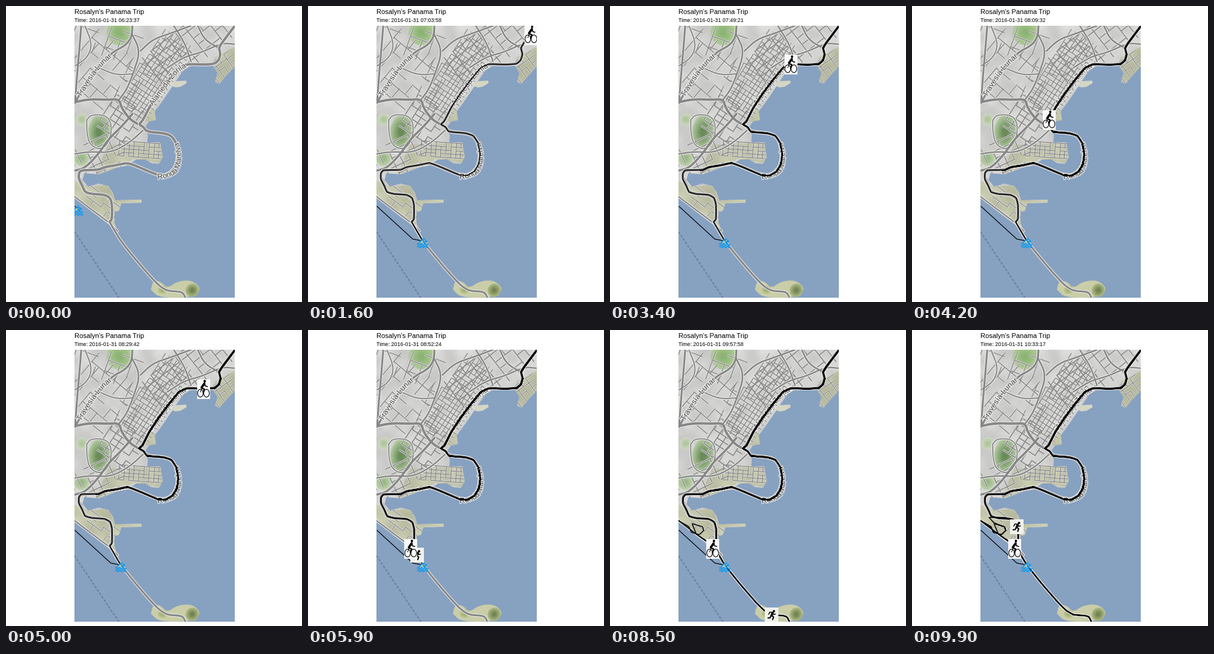
Recreate the animation shown at these times as a matplotlib script. Size 480 px wide and 480 px high, loop 10000 ms.

```python
import numpy as np
import matplotlib.pyplot as plt
from matplotlib.animation import FuncAnimation
from matplotlib.collections import LineCollection
from matplotlib.lines import Line2D
from matplotlib.patches import Circle, Ellipse, PathPatch, Polygon, Rectangle
from matplotlib.textpath import TextPath
from matplotlib.transforms import Affine2D

FRAMES = 100
PX = 0.72  # points per pixel at 100 dpi
ROAD, CASING, SEA, OLIVE = "#878787", "#eeeeec", "#87a1c1", "#c9cda8"
rng = np.random.default_rng(5)

fig = plt.figure(figsize=(4.8, 4.8), dpi=100, facecolor="white")
ax = fig.add_axes([0, 0, 1, 1])
panel = ax.add_patch(Rectangle((111, 32), 260, 441, fc=SEA, ec="none"))


# ---------- helpers ----------
def lengths(pts):
    step = np.hypot(*np.diff(pts, axis=0).T)
    return np.r_[0, np.cumsum(step)]


def along(pts, s):
    pts = np.asarray(pts, float)
    d = lengths(pts)
    return np.column_stack([np.interp(s, d, pts[:, 0]), np.interp(s, d, pts[:, 1])])


def smooth(pts, rounds=3):
    pts = np.asarray(pts, float)
    for _ in range(rounds):
        a, b = pts[:-1], pts[1:]
        mid = np.stack([0.75 * a + 0.25 * b, 0.25 * a + 0.75 * b], 1).reshape(-1, 2)
        pts = np.vstack([pts[:1], mid, pts[-1:]])
    return pts


def area(pts, color, z, clip=None, **kw):
    patch = ax.add_patch(Polygon(pts, fc=color, ec="none", zorder=z, **kw))
    patch.set_clip_path(clip or panel)
    return patch


def road(pts, width, z=5, color=ROAD, curve=True):
    xy = (smooth(pts) if curve else np.asarray(pts)).T
    for w, c, dz in ((width + 2, CASING, 0), (width, color, 0.1)):
        line, = ax.plot(*xy, color=c, lw=w * PX, zorder=z + dz,
                        solid_capstyle="round", solid_joinstyle="round")
        line.set_clip_path(panel)


def streets(cx, cy, w, h, angle, dx, dy, width, keep=0.85):
    """Rotated block grid whose segments are dropped at random."""
    segs = []
    for vertical in (False, True):
        span, cross, gap, cell = (h, w, dx, dy) if vertical else (w, h, dy, dx)
        for c in np.arange(-cross / 2, cross / 2 + 0.1, gap):
            c += rng.uniform(-0.12, 0.12) * gap
            for a in np.arange(-span / 2, span / 2, cell):
                if rng.random() < keep:
                    p = np.array([[a, c], [a + cell, c]])
                    segs.append(p[:, ::-1] if vertical else p)
    turn = np.radians(angle)
    rot = np.array([[np.cos(turn), np.sin(turn)], [-np.sin(turn), np.cos(turn)]])
    segs = [s @ rot + (cx, cy) for s in segs]
    for lw, color, z in ((width + 1.2, CASING, 4), (width, "#8e8e8d", 4.1)):
        lines = LineCollection(segs, colors=color, linewidths=lw * PX, zorder=z)
        ax.add_collection(lines).set_clip_path(land)


def label(text, pts, size):
    """Sets a street name letter by letter along a curve."""
    pts = smooth(pts)
    font = {"family": "Liberation Sans"}

    def edge(t):
        return TextPath((0, 0), t + "|", size=size, prop=font).get_extents().x1

    for i, ch in enumerate(text):
        if ch == " ":
            continue
        s0, s1 = (edge(text[:k]) - edge("") for k in (i, i + 1))
        a, b = along(pts, [s0, s1])
        turn = np.arctan2(b[1] - a[1], b[0] - a[0])
        move = Affine2D().scale(1, -1).rotate(turn).translate(*a)
        glyph = TextPath((0, 0), ch, size=size, prop=font).transformed(move)
        ax.add_patch(PathPatch(glyph, fc="white", ec="#f0f0ee", lw=2.6 * PX,
                               alpha=0.85, zorder=7))
        ax.add_patch(PathPatch(glyph, fc="#4a4a4a", ec="none", zorder=7.1))


# ---------- routes ----------
RIDE = [(186, 381), (176, 364), (168, 350), (172, 346), (172, 322), (169, 311),
        (160, 306), (140, 305), (128, 302), (124, 292), (118, 281), (118, 271),
        (122, 266), (150, 266), (160, 261), (180, 258), (197, 254), (215, 261),
        (245, 274), (258, 275), (270, 268), (277, 256), (279, 240), (276, 222),
        (268, 210), (255, 206), (228, 204), (223, 196), (215, 192), (221, 187),
        (232, 165), (245, 145), (262, 122), (280, 100), (293, 94), (320, 95),
        (338, 94), (345, 88), (348, 78), (345, 68), (350, 60), (371, 32), (400, -5)]
CAUSEWAY = [(168, 350), (176, 364), (186, 381), (210, 411), (236, 441), (250, 455),
            (262, 462), (280, 463), (287, 465), (291, 473), (296, 490)]
SHORE = [(168, 350), (140, 331), (111, 309), (100, 300)]
LOOP = [(100, 300), (111, 309), (128, 319), (132, 328), (145, 332), (152, 325),
        (150, 319), (133, 314), (140, 331), (168, 350)]
FINISH = LOOP[:7] + [(133, 313), (125, 304), (150, 304), (166, 307), (170, 319)]
SWIM = [(112, 325), (170, 378), (186, 381)]

# ---------- map ----------
land = area([(111, 32), (371, 32), (371, 98), (358, 112), (346, 126), (339, 123),
             (343, 109), (336, 97), (300, 97), (288, 104), (276, 121), (262, 142),
             (248, 162), (241, 171), (243, 185), (232, 187), (226, 196), (230, 210),
             (229, 222), (250, 221), (254, 245), (248, 256), (236, 255), (226, 249),
             (211, 249), (195, 259), (180, 262), (164, 268), (150, 273), (127, 271),
             (124, 282), (133, 293), (150, 288), (166, 292), (173, 302), (177, 315),
             (220, 314), (220, 319), (187, 320), (183, 332), (176, 334), (176, 352),
             (181, 365), (168, 355), (140, 334), (111, 309)], "#dddddb", 1)
area(smooth([(235, 460), (238, 446), (250, 446), (262, 458), (276, 447), (300, 444),
             (315, 456), (311, 466), (296, 473), (248, 473), (235, 460)]), OLIVE, 1)
area([(269, 130), (274, 122), (292, 121), (293, 125), (283, 131), (275, 132)],
     "#d5d6c4", 1)
for tint in ([(111, 283), (135, 293), (166, 290), (177, 315), (220, 314), (220, 319),
              (187, 320), (183, 332), (176, 352), (181, 365), (111, 309)],
             [(205, 223), (255, 220), (255, 256), (225, 250), (205, 248)],
             [(231, 165), (243, 170), (244, 187), (226, 187)],
             [(338, 84), (371, 66), (371, 100), (346, 127), (338, 122)],
             [(165, 225), (205, 223), (205, 250), (150, 273), (150, 262)]):
    area(tint, OLIVE, 1.5, land, alpha=0.85)

relief = rng.random((44, 26))
shade = ax.imshow(relief, cmap="gray", extent=(111, 371, 473, 32), aspect="auto",
                  interpolation="bicubic", alpha=0.13, zorder=2)
shade.set_clip_path(land)


def hill(x, y, w, h, light, dark, tilt=0):
    for k in np.linspace(1, 0.25, 9):
        mix = (np.array(light) * k + np.array(dark) * (1 - k)) / 255
        blob = ax.add_patch(Ellipse((x, y), w * k, h * k, angle=tilt, fc=tuple(mix),
                                    ec="none", zorder=3))
        blob.set_clip_path(panel)


hill(151, 204, 36, 58, (176, 200, 158), (82, 120, 66), 8)
hill(184, 43, 42, 42, (175, 203, 152), (130, 172, 105))
hill(122, 247, 25, 25, (190, 208, 172), (140, 175, 120))
hill(123, 184, 20, 20, (205, 214, 194), (165, 192, 145))
hill(302, 461, 21, 22, (172, 184, 130), (95, 115, 68), 30)
hill(254, 460, 16, 14, (190, 198, 145), (150, 165, 105))

streets(243, 112, 130, 54, -57, 8, 7, 1.6, 0.93)
streets(300, 62, 150, 64, -38, 17, 13, 1.9, 0.82)
streets(218, 233, 68, 24, 4, 8, 6, 1.6, 0.9)
streets(188, 185, 58, 60, 33, 12, 10, 2, 0.8)
streets(150, 100, 92, 80, -50, 19, 15, 1.7, 0.55)
streets(160, 50, 95, 36, 20, 18, 16, 1.7, 0.5)
streets(145, 245, 75, 50, -25, 14, 12, 1.9, 0.62)
streets(204, 130, 36, 80, 25, 13, 12, 1.6, 0.6)
streets(352, 103, 34, 40, -35, 11, 9, 1.5, 0.6)
streets(150, 318, 70, 26, 36, 14, 9, 1.5, 0.5)

road([(122, 32), (119, 70), (115, 115), (112, 157)], 3)
road([(205, 32), (204, 50), (194, 64), (172, 75), (148, 100), (124, 135),
      (112, 157)], 3.2)
road([(111, 156), (135, 151), (165, 152), (184, 151), (187, 165), (201, 184),
      (215, 192)], 4)
road([(111, 267), (128, 263), (150, 240), (166, 216), (188, 195), (205, 175)], 3.6)
road([(184, 151), (196, 135), (206, 110), (218, 73), (204, 45)], 2.6)
road([(218, 73), (238, 54), (265, 45), (300, 32)], 2.6)
road([(300, 90), (290, 60), (272, 32)], 2.4)
road([(345, 68), (322, 55), (311, 32)], 2.6)
road([(371, 62), (350, 60), (318, 75), (290, 82), (262, 100)], 2.4)
road([(131, 185), (138, 176), (162, 177), (171, 190), (170, 214), (156, 234),
      (136, 226), (131, 205), (131, 185)], 1.8)
road([(112, 97), (132, 84), (140, 62), (128, 32)], 2)
road([(150, 100), (178, 112), (206, 110)], 2)
road([(111, 240), (136, 236), (170, 238), (200, 222), (224, 200)], 2.4)
road([(181, 365), (168, 352), (140, 331), (111, 309)], 2.2, curve=False)
road(CAUSEWAY, 3, 5.5)
road(RIDE[2:], 4, 5.5)

ferry, = ax.plot([111, 183], [366, 473], color="#6b7e98", lw=2 * PX,
                 dashes=(2, 1.3), zorder=2)
ferry.set_clip_path(panel)

label("Travesía Lunar", [(121, 148), (133, 128), (150, 103), (165, 88), (182, 74)], 12.5)
label("Alameda Zorila", [(238, 162), (252, 143), (270, 118), (285, 102), (306, 94)], 12.5)
label("Ronda Marelva", [(246, 281), (262, 279), (280, 270), (285, 250), (283, 230),
                        (273, 206)], 12.5)

# ---------- trails and icons ----------
RIDE_START = lengths(RIDE)[2]
RIDE_T = [4, 11, 12, 15.2, 16, 17, 18, 19, 20, 21, 22, 23, 24, 28, 29, 32.2, 33, 34,
          35, 36, 37, 38, 39, 40, 44, 45, 48, 49, 50, 53, 54, 55, 56, 58]
RIDE_S = [-37, 624, 693, 693, 631, 545, 460, 375, 293, 212, 163, 147, 245, 600, 693,
          693, 615, 528, 445, 355, 262, 195, 158, 205, 618, 693, 693, 640, 555, 300,
          215, 176, 118, 0]
RUN = [(58.4, 65.4, CAUSEWAY), (66.2, 72.8, CAUSEWAY[::-1]), (72.8, 75, SHORE),
       (75, 80, LOOP), (80, 86.15, CAUSEWAY[:-1]), (86.15, 92.9, CAUSEWAY[-2::-1]),
       (92.9, 95.5, SHORE), (95.5, 98.8, FINISH)]


def swim_at(t):
    total = lengths(SWIM)[-1]
    return along(SWIM, np.interp([t], [0, 4], [5, total]))[0]


def ride_trail(t):
    ts = np.arange(4, np.clip(t, 4.1, 58) + 0.01, 0.02)
    s = np.interp(ts, RIDE_T, RIDE_S)
    xy = along(RIDE, s + RIDE_START)
    xy[np.gradient(s) < 0] += 0.8  # the way back keeps to the other lane
    return xy


def run_trail(t):
    parts = [np.empty((0, 2))]
    for a, b, pts in RUN:
        if t >= a:
            end = lengths(pts)[-1] * min(1, (t - a) / (b - a))
            parts.append(along(pts, np.linspace(0, end, 80)))
    return np.vstack(parts)


def trail(width):
    line, = ax.plot([], [], color="black", lw=width * PX, zorder=9,
                    solid_joinstyle="round")
    line.set_clip_path(panel)
    return line


class Icon:
    def __init__(self, z):
        self.move, self.parts, self.z = Affine2D(), [], z

    def add(self, artist):
        artist.set_transform(self.move + ax.transData)
        artist.set_zorder(self.z + len(self.parts) / 50)
        ax.add_artist(artist)
        artist.set_clip_path(panel)
        self.parts.append(artist)

    def stroke(self, pts, w, color="black"):
        self.add(Line2D(*np.transpose(pts), color=color, lw=w * PX,
                        solid_capstyle="round", solid_joinstyle="round"))

    def place(self, xy, visible=True):
        self.move.clear().translate(*xy)
        for p in self.parts:
            p.set_visible(visible)


swimmer, rider, runner = Icon(10), Icon(12), Icon(11)

swimmer.stroke([(-5, 0), (-1, -4), (3, -5)], 2.2, "#159be8")
swimmer.stroke([(-1, -4), (3, 1)], 2.4, "#1a8fe0")
swimmer.stroke([(-3, 0), (0, -2)], 1.4, "#e8e86a")
swimmer.add(Circle((5, -2), 2, fc="#1598e6", ec="none"))
swimmer.add(Circle((1, -7), 1.3, fc="#2bb0ee", ec="none"))
wave = np.linspace(-8.5, 8.5, 30)
for y in (3, 7):
    swimmer.stroke(np.column_stack([wave, y + 1.4 * np.sin(wave * 1.1)]), 1.8, "#0f9cf0")

rider.add(Rectangle((-10.5, -16), 21, 32, fc="#f8f8f8", ec="none"))
for x in (-5, 5):
    rider.add(Ellipse((x, 6.7), 9, 12.5, fc="white", ec="black", lw=1.1 * PX))
rider.add(Ellipse((2, -12.8), 3.6, 4.4, fc="black", ec="none"))
rider.stroke([(1.5, -9), (-3, -2.5)], 3.6)
rider.stroke([(2, -8.5), (3, -5), (6.5, -4)], 1.6)
rider.stroke([(-3, -1.5), (1.5, 0), (-0.5, 6)], 2.1)
rider.stroke([(-5, 5), (-3, 0)], 1)

runner.add(Rectangle((-11, -12), 22, 24, fc="#f1f1ec", ec="none"))
runner.add(Circle((3.5, -6), 1.9, fc="black", ec="none"))
runner.stroke([(1.5, -3.5), (-0.5, 1)], 3.4)
runner.stroke([(-5, -1), (-3, -4.5), (1.5, -4), (3, -0.5), (6, -1.5)], 1.5)
runner.stroke([(0, 1), (3, 3.5), (1.5, 7.5)], 2)
runner.stroke([(-1, 1), (-2.5, 4.5), (-6, 5)], 2)

swim_line, ride_line, run_line = trail(1.2), trail(1.5), trail(1.5)

ax.text(111, 13, "Rosalyn's Panama Trip", family="Liberation Sans", size=11 * PX)
clock = ax.text(111, 26, "", family="Liberation Sans", size=8.8 * PX)
START = (6 * 60 + 23) * 60 + 37

ax.set(xlim=(0, 480), ylim=(480, 0))
ax.axis("off")


def update(i):
    now = START + i * 14980 // (FRAMES - 1)
    clock.set_text(f"Time: 2016-01-31 {now // 3600:02}:{now // 60 % 60:02}:{now % 60:02}")

    pos = swim_at(i)
    done = [p for p in SWIM if p[0] < pos[0]] + [tuple(pos)]
    swim_line.set_data(*np.transpose(done))
    swimmer.place(pos + (0, 2.5))

    ride = ride_trail(i)
    ride_line.set_data(*(ride.T if i > 4 else ([], [])))
    rider.place((166.5, 355) if i >= 58 else ride[-1], i > 4)

    run = run_trail(i)
    run_line.set_data(*run.T)
    runner.place(run[-1] if len(run) else (0, 0), len(run) > 0)
    return swim_line, ride_line, run_line, clock


anim = FuncAnimation(fig, update, frames=FRAMES, interval=100, repeat=True,
                     repeat_delay=0, blit=False)
plt.show()
```
